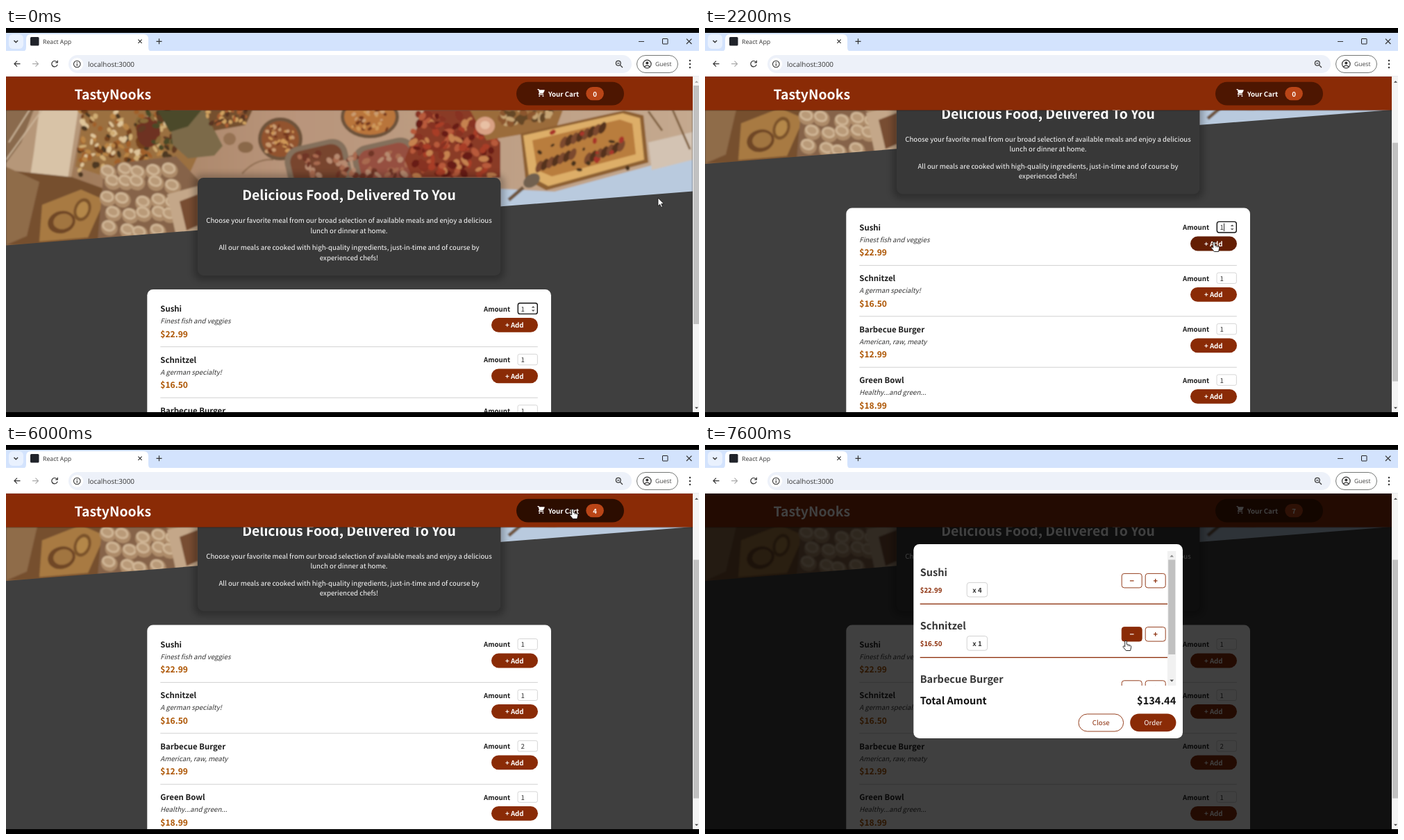
Recreate the animation shown at these times as an HTML page. Size 998 by 561 pixels, loop 8000 ms.

```html
<!DOCTYPE html>
<html lang="en">
<head>
<meta charset="utf-8">
<title>Meal ordering demo</title>
<style>
html, body { margin: 0; width: 100%; height: 100%; overflow: hidden; background: #000; }
svg { display: block; width: 998px; height: 561px; }
text { font-family: "Noto Sans CJK JP", "Noto Sans JP", "Noto Sans", sans-serif; font-size: 9.7px; white-space: pre; text-rendering: geometricPrecision; }
.b { font-weight: 700; }
.ui { font-family: "Open Sans", "Noto Sans", sans-serif; }
</style>
</head>
<body>
<svg id="stage" viewBox="0 0 998 561"></svg>
<script>
const RED = '#8a2b06', LOOP = 8000, STEP = 100, PITCH = 73.45;
const stage = document.getElementById('stage');

// ---- drawing helpers ----
const rect = (x, y, w, h, fill, r = 0, more = '') =>
  `<rect x="${x}" y="${y}" width="${w}" height="${h}" rx="${r}" fill="${fill}" ${more}/>`;
const oval = (x, y, rx, ry, fill, turn = 0, more = '') =>
  `<ellipse rx="${rx}" ry="${ry}" fill="${fill}" transform="translate(${x} ${y}) rotate(${turn})" ${more}/>`;
const path = (d, fill, more = '') => `<path d="${d}" fill="${fill}" ${more}/>`;
const line = (d, color, w = 1.2) => path(d, 'none', `stroke="${color}" stroke-width="${w}"`);
const text = (x, y, s, fill, size = 9.7, cls = '', more = '') =>
  `<text x="${x}" y="${y}" fill="${fill}" class="${cls}" style="font-size:${size}px" ${more}>${s}</text>`;
const MID = 'text-anchor="middle"', END = 'text-anchor="end"';
const group = (body, more) => `<g ${more}>${body}</g>`;
const triangle = (x, y, s, fill) => path(`M${x - Math.abs(s)} ${y + s / 2}h${2 * Math.abs(s)}l${-Math.abs(s)} ${-s}z`, fill);

// ---- timeline ----
// Each key: [time, value, value, ...]
const scrollKeys = [[0, 0], [700, 0], [800, .8], [1300, 158], [1500, 158], [1800, 117.4], [LOOP, 117.4]];
const pointerKeys = [
  [0, 939, 245], [700, 994, 178], [800, 995, 175], [1300, 983, 286], [1500, 981, 270], [1800, 980, 241],
  [2200, 733, 308], [2400, 733, 310], [2700, 735, 380], [2900, 735, 381], [3400, 737, 444], [3600, 752, 435],
  [4800, 752, 435], [5100, 729, 455], [5500, 729, 456], [6000, 816, 92], [6400, 816, 92], [6600, 648, 196],
  [6900, 648, 196], [7000, 649, 272], [7100, 649, 272], [7200, 606, 282], [LOOP, 606, 282]];
const cartKeys = [[0, 0], [2300, 1], [2900, 2], [5400, 4], [6700, 5], [6800, 6], [6900, 7], [7100, 8], [7500, 7]];

function at(keys, t) {
  const i = keys.findIndex(k => k[0] > t), [a, b] = [keys[i - 1], keys[i]];
  const p = (t - a[0]) / (b[0] - a[0]);
  return a.slice(1).map((v, n) => v + (b[n + 1] - v) * p);
}

// ---- page content ----
const meals = [
  ['Sushi', 'Finest fish and veggies', 22.99],
  ['Schnitzel', 'A german specialty!', 16.5],
  ['Barbecue Burger', 'American, raw, meaty', 12.99],
  ['Green Bowl', 'Healthy...and green...', 18.99]];
const money = n => '$' + n.toFixed(2);

const photo = (() => {
  let seed = 7;
  const rnd = (a, b) => (seed = seed * 16807 % 2147483647, a + (b - a) * seed / 2147483647);
  const scatter = (n, x0, y0, x1, y1, size, colors) => Array.from({ length: n }, (_, i) =>
    oval(rnd(x0, x1), rnd(y0, y1), rnd(size / 2, size), rnd(size / 3, size * .7), colors[i % colors.length], rnd(0, 180))).join('');
  const rolls = (x, y, n) => Array.from({ length: n }, (_, i) =>
    oval(x + i * 8, y - i * 3, 4.5, 9, i % 2 ? '#55301f' : '#7c4a2d', 25)).join('');
  const tray = (x, y, fill) => group(rect(-46, -37, 92, 74, '#84705c', 22) + rect(-38, -30, 76, 60, fill, 16),
    `transform="translate(${x} ${y}) rotate(-13)"`);
  let s = rect(0, 100, 989, 230, 'url(#cloth)');

  // Linen and warming dishes on the left
  s += path('M0 118H112L92 225 0 250Z', '#b69779') + path('M48 118H104L88 225 30 245 40 180Z', '#d8c3a7');
  s += path('M0 118H40L22 165 0 195Z', '#8a6b4d') + line('M4 165L34 118M0 190L52 118', '#cdb79c', 2);
  s += path('M0 205L95 215 150 235 135 313H0Z', '#76502f') + path('M0 200L48 222 30 300 0 313Z', '#8f6c4a');
  s += path('M52 255L108 233 142 248 118 302 48 308Z', '#a87a43');
  s += oval(80, 280, 20, 16, '#6f4727', -15) + oval(82, 279, 14, 11, '#a1743f', -15);
  s += oval(110, 262, 12, 17, '#7c522c', 20) + oval(110, 262, 8, 12, '#b48748', 20);

  // Cheese board, fruit and cups
  s += path('M112 118H250L285 165 262 215 160 220 100 200Z', '#9b7040');
  s += scatter(190, 106, 120, 240, 212, 6, ['#d0ad73', '#74421f', '#b98444', '#4d3820', '#dfc59a', '#a1602c']);
  s += oval(205, 150, 17, 22, '#6e3020') + scatter(25, 190, 120, 245, 180, 7, ['#4c4a28', '#623a22', '#8a6a38']);
  s += path('M236 132L285 118 312 170 300 184 262 188 240 168Z', '#7c6a49') + path('M218 118H282L262 142 236 150Z', '#4b4929');
  s += path('M140 215L160 195 245 185 278 220V308H132Z', '#86644a');
  for (let i = 0; i < 24; i++) {
    const y = 205 + Math.floor(i / 5) * 22 + rnd(-5, 5), x = 152 + i % 5 * 21 + rnd(-6, 6);
    s += oval(x, y, 12, 11, '#ad8b69', 20) + oval(x - 1, y - 3, 10, 8, '#d0b696', 20) + oval(x - 1, y - 3, 7, 5, '#b99a78', 20);
  }
  s += path('M232 240L276 228V295L245 300Z', '#c4a789') + path('M250 250L276 240V285L260 292Z', '#784e32');

  // Pans, trays and the fruit platter
  s += path('M285 118H355L345 140 300 148Z', '#75502f') + scatter(35, 290, 118, 346, 140, 5, ['#a85d30', '#d0a260', '#583420']);
  s += oval(322, 160, 9, 9, '#967252') + oval(345, 172, 11, 8, '#8a6848') + line('M340 210Q360 188 385 190', '#8d6c50', 2);
  for (const [x, y, rx, ry, c] of [[395, 160, 32, 31, '#92522f'], [524, 128, 42, 31, '#b9743a']])
    s += oval(x, y, rx, ry, '#6e533a') + oval(x, y, rx - 5, ry - 5, c) +
      scatter(45, x - rx * .6, y - ry * .6, x + rx * .6, y + ry * .6, 4, ['#cf9858', '#75371e', '#c99b70']);
  s += tray(450, 202, '#78452f') + tray(548, 200, '#965040');
  s += scatter(55, 422, 180, 580, 215, 7, ['#a96b50', '#703527', '#b78a70']);
  s += path('M602 118H672L712 165V216H585L574 190Z', '#8a3a26');
  s += scatter(130, 582, 124, 705, 214, 8, ['#a83c28', '#c68250', '#681f18', '#b85a3a', '#873022']);

  // Blue linen and the roll trays on the right
  s += path('M712 232L790 236 989 182V250L712 275Z', '#b9cade') + path('M925 165L989 150V190L930 205Z', '#d3c3b3');
  s += path('M668 118H802L792 145 692 162Z', '#9b6c3b') + oval(690, 141, 14, 13, '#d9a184') + oval(690, 140, 7, 6, '#e8c0a4');
  s += scatter(32, 712, 120, 782, 138, 8, ['#654628', '#c6a574', '#8c572f']);
  s += path('M741 152L890 119 918 126 925 194 778 234 748 218Z', '#8e6033') + path('M745 155L888 123 913 130 919 190 781 228 753 213Z', '#ddae68');
  s += path('M758 162L884 132 902 138 907 182 786 214 765 205Z', '#b97d3e');
  s += rolls(768, 200, 7) + rolls(803, 165, 8) + rolls(838, 188, 7);
  s += scatter(16, 765, 145, 900, 205, 5, ['#a8352a', '#49331c']);
  s += oval(757, 220, 13, 9, '#716150', -35) + line('M745 230L724 248', '#70573f', 5) + line('M925 120L945 148M960 118L985 175', '#80613f', 3);
  return group(group(s, 'filter="url(#focus)"'), 'clip-path="url(#slope)"');
})();

const defs = `<defs>
  <clipPath id="slope"><path d="M0 100H989V235.5L0 313.5Z"/></clipPath>
  <clipPath id="list"><rect x="305" y="153" width="375" height="194"/></clipPath>
  <linearGradient id="cloth"><stop offset="0" stop-color="#98724f"/><stop offset=".4" stop-color="#b8947a"/><stop offset="1" stop-color="#c4a98f"/></linearGradient>
  <filter id="focus" x="0" y="0" width="1" height="1"><feGaussianBlur stdDeviation="1.1"/></filter>
  <filter id="soft" x="-20%" y="-30%" width="140%" height="160%"><feGaussianBlur stdDeviation="5"/></filter></defs>`;

const summary = rect(270, 211, 448, 153, '#000', 12, 'opacity=".25" filter="url(#soft)"') +
  rect(276, 216, 436.4, 141, '#383838', 8.5) +
  text(494, 248, 'Delicious Food, Delivered To You', '#fff', 19.4, 'b', MID) +
  ['Choose your favorite meal from our broad selection of available meals and enjoy a delicious',
    'lunch or dinner at home.',
    'All our meals are cooked with high-quality ingredients, just-in-time and of course by',
    'experienced chefs!'].map((s, i) => text(494, [281.2, 295.8, 320.2, 334.8][i], s, '#fff', 9.7, '', MID)).join('');

const browser = (() => {
  const ink = '#333', cross = (x, y, r) => line(`M${x - r} ${y - r}l${2 * r} ${2 * r}m0 ${-2 * r}l${-2 * r} ${2 * r}`, ink);
  return rect(0, 0, 998, 7, '#000') + rect(0, 554, 998, 7, '#000') +
    rect(0, 7, 998, 27, '#d3e3fd') + rect(0, 33, 998, 37, '#fff') + rect(0, 69.3, 998, .7, '#dfe3ea') +
    rect(4, 9, 21, 21, '#e9f1fe', 6) + line('M11.5 18l2.8 2.8 2.8-2.8', ink, 1.4) +
    path('M23 34q6 0 6-6V16q0-7 7-7H198q7 0 7 7V28q0 6 6 6z', '#fff') +
    rect(35, 13, 12.5, 12.5, '#20232a', 1.5) + text(53, 22.8, 'React App', ink, 8.8, 'ui') +
    cross(193, 19.3, 2.6) + line('M216.5 19.3h8m-4-4v8', ink) +
    line('M911 19.5h8', ink, 1) + rect(945.5, 15.5, 7.5, 7.5, 'none', .5, 'stroke="#222"') + cross(983.7, 19.3, 3.7) +
    line('M20.5 51.7h-8.5m4-4l-4 4 4 4', ink) + line('M38 51.7h8.5m-4-4l4 4-4 4', '#aaa') +
    line('M73.6 49.5a4.2 4.2 0 1 0 .5 3.2M74.3 46.8v3.2h-3.2', ink) +
    rect(90, 39, 811, 26, '#edf1f9', 13) + oval(102.3, 52, 9, 9, '#fff') +
    oval(102.3, 52, 4.8, 4.8, 'none', 0, 'stroke="#333" stroke-width="1.1"') + line('M102.3 51.3v3.4m0-5.8v1.3', ink) +
    text(118, 55.7, 'localhost:3000', '#333', 9.95, 'ui') +
    oval(881.8, 50.8, 3.4, 3.4, 'none', 0, 'stroke="#333" stroke-width="1.2"') + line('M884.3 53.3l3.7 3.7M880.2 50.8h3.2', ink) +
    rect(908.5, 39.5, 59, 25, '#fff', 12.5, 'stroke="#747775"') +
    oval(923.3, 52, 5.8, 5.8, 'none', 0, 'stroke="#333" stroke-width="1.2"') + oval(923.3, 50.4, 2, 2, '#333') + line('M919.3 56q4-3.8 8 0', ink) +
    text(935, 55.2, 'Guest', '#444', 8.6, 'ui') + [47, 52, 57].map(y => oval(985, y, 1.2, 1.2, ink)).join('');
})();

const cartIcon = path('M3 1a1 1 0 000 2h1.22l1.7 6.7-.9.9C3.74 11.85 4.63 14 6.41 14H15a1 1 0 000-2H6.41l1-1H14a1 1 0 00.9-.55l3-6A1 1 0 0017 3H6.28l-.31-1.24A1 1 0 005 1zM16 16.5a1.5 1.5 0 11-3 0 1.5 1.5 0 013 0zM6.5 18a1.5 1.5 0 100-3 1.5 1.5 0 000 3z',
  '#fff', 'transform="translate(764 87.4) scale(.65)"');

const pointers = {
  arrow: path('M0 0V11.8L2.7 9.3 4.6 13.5 6.5 12.7 4.7 8.6H8.4Z', '#fff', 'stroke="#111" stroke-width=".8"'),
  hand: path('M-1.3 1Q0-.8 1.3 1V5.5L6.5 7Q8 7.5 7.7 9.5L6.6 14.5H.4L-3.9 9.3Q-4 7.5-2.4 8L-1.3 9Z', '#fff', 'stroke="#111" stroke-width=".9"') +
    line('M3 6.2V8.5M5.2 6.9V9', '#333', .6),
  beam: line('M-2-5.5Q0-5.5 0-4.5 0-5.5 2-5.5M0-4.5V4.5M-2 5.5Q0 5.5 0 4.5 0 5.5 2 5.5', '#222', .9)
};

function draw(t) {
  const [scroll] = at(scrollKeys, t), [px, py] = at(pointerKeys, t);
  const [clicked, count] = cartKeys.filter(k => k[0] <= t).pop();
  const open = t > 6100;
  let pointer = 'arrow';
  const over = (x, y, w, h, kind = 'hand') => {
    const hit = px >= x && px <= x + w && py >= y && py <= y + h;
    if (hit) pointer = kind;
    return hit;
  };

  const focus = t < 2300 ? 0 : t >= 3800 && t < 5400 ? 2 : -1;
  const amount = i => i !== 2 || t < 4500 ? '1' : t < 4700 ? '' : '2';
  const caret = focus === 0 ? t % 700 >= 100 && t % 700 <= 400 : t < 4200 || t >= 4500 && t < 4900;

  const row = ([name, note, price], i) => {
    const dy = i * PITCH, top = dy - scroll, focused = focus === i;
    const hot = !open && over(699, 418 + top, 67, 21);
    if (!open) over(737, 397 + top, 20, 16, 'beam');
    return group(
      text(222.3, 409.4, name, '#1c1c1c', 11.4, 'b') +
      text(222.3, 426.4, note, '#333', 9.7, '', 'font-style="italic"') +
      text(222.3, 445.8, money(price), '#ad5502', 12.12, 'b') +
      text(688, 408.8, 'Amount', '#1c1c1c', 9.7, 'b') +
      (focused ? rect(737.3, 396.8, 28, 15.6, '#fff', 3, 'stroke="#111" stroke-width="1.4"') +
        triangle(759.2, 402.2, 2.4, '#555') + triangle(759.2, 407.8, -2.4, '#555') +
        (caret ? rect(amount(i) ? 747 : 741.5, 399, .9, 11.5, '#111') : '')
        : rect(737, 396.9, 28.4, 15.5, '#fff', 2.5, 'stroke="#ccc" stroke-width=".8"')) +
      text(741.6, 408.8, amount(i), '#333') +
      rect(699, 418, 67, 20.8, hot ? '#641e03' : RED, 10.4) +
      text(732.3, 432.2, '+ Add', '#fff', 9.7, 'b', MID) +
      rect(222.3, 459.3, 543.5, .9, '#ccc'), `transform="translate(0 ${dy})"`);
  };

  const page = rect(0, 70, 989, 484, '#3f3f3f') + group(photo + summary +
    rect(203.3, 377, 581.7, 323, '#fff', 8.5) + meals.map(row).join(''), `transform="translate(0 ${-scroll})"`);

  const cartHot = !open && over(735, 78, 155, 34);
  const bump = t - clicked < 100 && count ? 1.14 : 1;
  const header = rect(0, 70, 989, 49.5, '#000', 0, 'opacity=".25"') + rect(0, 70, 989, 48.5, RED) +
    text(98.4, 102.6, 'TastyNooks', '#fff', 19.4, 'b') +
    group(rect(735, 77.8, 155, 33.8, cartHot ? '#2c0d00' : '#4d1601', 16.9) + cartIcon +
      text(781, 98.5, 'Your Cart', '#fff', 9.7, 'b') + rect(835.3, 85, 25.6, 19.2, '#b94517', 9.6) +
      text(848, 98.5, count, '#fff', 9.7, 'b', MID), `transform="translate(812.5 94.7) scale(${bump}) translate(-812.5 -94.7)"`);

  const y0 = 83 + scroll * .703, dragging = t >= 700 && t <= 1800;
  const bar = rect(989, 70, 9, 484, '#f4f4f4') + triangle(994.5, 77.5, 2.6, scroll ? '#444' : '#a0a0a0') +
    rect(990, y0, 8, 344, dragging ? '#787878' : '#c1c1c1') + triangle(994.5, 548, -2.6, scroll >= 158 ? '#a0a0a0' : '#444');

  let overlay = '';
  if (open) {
    const p = Math.min(1, (t - 6100) / 200), ease = 1 - (1 - p) ** 2;
    const qty = [1 + [6700, 6800, 6900].filter(c => c <= t).length, t >= 7100 && t < 7500 ? 2 : 1, 2];
    const button = (x, i, sign) => {
      const hot = over(x, 185.4 + i * 77.2, 29, 20.5);
      return rect(x, 185.4, 29, 20.5, hot ? RED : 'none', 3.6, `stroke="${RED}" stroke-width=".9"`) +
        text(x + 14.5, 199.7, sign, hot ? '#fff' : RED, 11, 'b', MID);
    };
    const entries = meals.slice(0, 3).map(([name, , price], i) => group(
      text(309.7, 189, name, '#363636', 14.55, 'b') + text(309.7, 212.6, money(price), RED, 9.7, 'b') +
      rect(377.2, 198.4, 29.5, 20.6, 'none', 3.6, 'stroke="#ccc" stroke-width=".9"') +
      text(392, 212.6, 'x ' + qty[i], '#363636', 9.7, 'b', MID) +
      button(600.2, i, '−') + button(634.2, i, '+') + rect(309.7, 228.6, 356.3, 1.3, RED), `transform="translate(0 ${i * 77.2})"`)).join('');
    const total = meals.slice(0, 3).reduce((sum, m, i) => sum + m[2] * qty[i], 0);
    overlay = rect(0, 70, 989, 484, '#000', 0, 'opacity=".75"') + group(
      rect(300.3, 143, 387.7, 280, '#fff', 8.5) + group(entries, 'clip-path="url(#list)"') +
      rect(666, 153, 12.3, 194, '#f1f1f1') + rect(667.2, 165.5, 10, 136.5, '#c1c1c1') +
      triangle(672.2, 160, 2.8, '#888') + triangle(672.2, 340, -2.8, '#505050') +
      text(309.7, 373.7, 'Total Amount', '#111', 14.55, 'b') + text(678.3, 373.7, money(total), '#111', 14.55, 'b', END) +
      rect(538, 388, 64.6, 25, '#fff', 12.5, `stroke="${RED}" stroke-width=".9"`) + text(570.2, 404.3, 'Close', RED, 9.7, '', MID) +
      rect(612.2, 387.6, 66.2, 25.6, RED, 12.8) + text(645.3, 404.3, 'Order', '#fff', 9.7, '', MID),
      `opacity="${ease}" transform="translate(0 ${-29 * (1 - ease)})"`);
  }

  stage.innerHTML = defs + page + header + overlay + bar + browser + group(pointers[pointer], `transform="translate(${px} ${py})"`);
}

let shown = -1;
function tick(now) {
  const t = Math.floor((now + 5) % LOOP / STEP) * STEP;
  if (t !== shown) draw(shown = t);
  requestAnimationFrame(tick);
}
draw(0);
requestAnimationFrame(tick);
</script>
</body>
</html>
```
